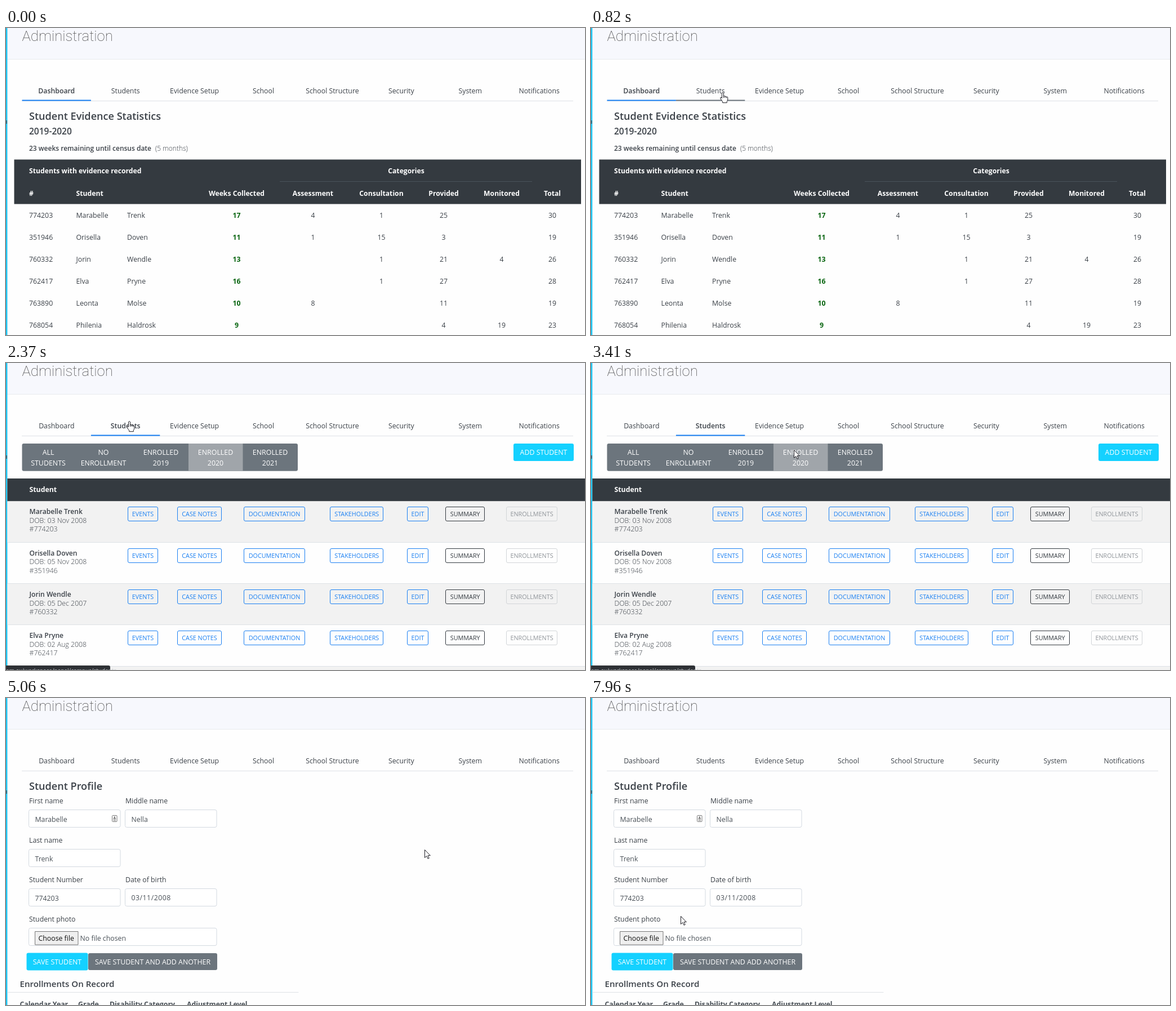
An HTML page with a canvas for the animation above (8 s loop, 1028 px wide and 545 px high).

```html
<!DOCTYPE html>
<html lang="en">
<head>
<meta charset="utf-8">
<title>Administration</title>
<style>
html, body { margin: 0; width: 100%; height: 100%; overflow: hidden; background: #fefefe; }
canvas { display: block; width: 1028px; height: 545px; }
</style>
</head>
<body>
<canvas id="stage" width="1028" height="545"></canvas>
<script>
const ctx = document.getElementById('stage').getContext('2d');
const LOOP = 8000;
const INK = '#3b4148', DARK = '#343a40', LINE = '#dee2e6', BLUE = '#1b80f2',
      CYAN = '#14d1ff', GREY = '#6c757d', BODY = 12.3, CAPS = 12.4, ROW = 39;

const TABS = ['Dashboard', 'Students', 'Evidence Setup', 'School', 'School Structure',
  'Security', 'System', 'Notifications'];

// number, first, last, weeks, assessment, consultation, provided, monitored, total, birth
const PUPILS = [
  ['774203', 'Marabelle', 'Trenk', 17, 4, 1, 25, '', 30, '03 Nov 2008'],
  ['351946', 'Orisella', 'Doven', 11, 1, 15, 3, '', 19, '05 Nov 2008'],
  ['760332', 'Jorin', 'Wendle', 13, '', 1, 21, 4, 26, '05 Dec 2007'],
  ['762417', 'Elva', 'Pryne', 16, '', 1, 27, '', 28, '02 Aug 2008'],
  ['763890', 'Leonta', 'Molse', 10, 8, '', 11, '', 19],
  ['768054', 'Philenia', 'Haldrosk', 9, '', '', 4, 19, 23]
];
const COLUMNS = [['Weeks Collected', 409.5], ['Assessment', 545], ['Consultation', 666.5],
  ['Provided', 777], ['Monitored', 880], ['Total', 970]];
const ACTIONS = [['EVENTS', 216, 54], ['CASE NOTES', 304, 79], ['DOCUMENTATION', 422, 109],
  ['STAKEHOLDERS', 575.5, 94.5], ['EDIT', 712, 38], ['SUMMARY', 780.5, 69.5], ['ENROLLMENTS', 888, 91]];
const FILTERS = [['ALL', 'STUDENTS', 75], ['NO', 'ENROLLMENT', 173], ['ENROLLED', '2019', 275],
  ['ENROLLED', '2020', 372], ['ENROLLED', '2021', 469]];
const FIELDS = [
  ['First name', 'Marabelle', 40.5, 198.5],
  ['Middle name', 'Nella', 211.5, 198.5],
  ['Last name', 'Trenk', 40.5, 268.5],
  ['Student Number', '774203', 40.5, 338.5],
  ['Date of birth', '03/11/2008', 211.5, 338.5]
];

// Pointer keys: time, x, y
const PATH = [
  [0, 535, 560], [270, 525, 550], [440, 391, 345], [560, 322, 232], [760, 245, 128], [1060, 217, 98],
  [1620, 217, 98], [1680, 219, 103], [2960, 219, 103], [3180, 262, 118], [3410, 359, 154],
  [3750, 634, 245], [4000, 738, 273], [4150, 748, 274], [4480, 743, 269], [5620, 743, 269],
  [5800, 690, 277], [6000, 574, 283], [6150, 440, 289], [6410, 220, 244], [6620, 148, 221],
  [6770, 148, 221], [6790, 147, 221], [7370, 147, 221], [7500, 157, 255], [7730, 165, 345],
  [7960, 159, 387], [LOOP, 159, 387]
];

function slope(i, axis) {
  const a = PATH[i - 1], b = PATH[i], c = PATH[i + 1];
  if (!a || !c) return 0;
  const still = (p, q) => p[1] === q[1] && p[2] === q[2];
  return still(a, b) || still(b, c) ? 0 : (c[axis] - a[axis]) / (c[0] - a[0]);
}

function pointerAt(t) {
  let i = 0;
  while (i < PATH.length - 2 && t >= PATH[i + 1][0]) i++;
  const a = PATH[i], b = PATH[i + 1], span = b[0] - a[0], u = Math.max(0, (t - a[0]) / span);
  const at = axis => {
    const d = b[axis] - a[axis], m = slope(i, axis) * span, n = slope(i + 1, axis) * span;
    return a[axis] + u * (m + u * (3 * d - 2 * m - n + u * (m + n - 2 * d)));
  };
  return { x: at(1), y: at(2) };
}

const inside = (p, x, y, w, h) => p.x >= x && p.x < x + w && p.y >= y && p.y < y + h;
const ramp = (t, from, to) => Math.min(1, Math.max(0, (t - from) / (to - from)));

function rect(x, y, w, h, color) {
  ctx.fillStyle = color;
  ctx.fillRect(x, y, w, h);
}

function box(x, y, w, h, r, fill, stroke) {
  ctx.beginPath();
  ctx.roundRect(x, y, w, h, r);
  if (fill) { ctx.fillStyle = fill; ctx.fill(); }
  if (stroke) { ctx.strokeStyle = stroke; ctx.lineWidth = 1; ctx.stroke(); }
}

function text(s, x, y, { size = BODY, weight = 400, color = INK, align = 'left', family = 'Open Sans', gap = 0 } = {}) {
  ctx.font = `${weight} ${size}px "${family}", sans-serif`;
  ctx.letterSpacing = gap + 'px';
  ctx.textAlign = align;
  ctx.fillStyle = color;
  ctx.fillText(s, x, y);
}
const centered = (s, x, y, style) => text(s, x, y, { align: 'center', ...style });

function drawShell(active, hover) {
  rect(0, 0, 1028, 545, '#fefefe');
  rect(0, 0, 1028, 55, '#f7f8fd');
  rect(0, 55, 1028, 1, '#e8eaef');
  rect(0, 0, 2.4, 545, '#1cc5f3');
  rect(0, 164, 2, 6, '#2b6f86');
  text('Administration', 28.5, 22.5, { size: 25.7, weight: 200, family: 'Roboto', color: '#444' });
  rect(28, 129, 979, 1, LINE);
  TABS.forEach((name, i) => {
    const on = i === active;
    centered(name, 89.8 + i * 122.4, 116, { weight: on ? 600 : 400 });
    if (on || i === hover) rect(28.5 + i * 122.4, 127.5, 122.4, 2, on ? BLUE : GREY);
  });
}

function drawDashboard(hoverRow) {
  text('Student Evidence Statistics', 41, 162.5, { size: 18.1, weight: 600 });
  text('2019-2020', 41, 188.5, { size: 15.5, weight: 600 });
  text('23 weeks remaining until census date', 41, 218, { size: 12, weight: 600 });
  text('(5 months)', 265, 218, { size: 12, weight: 300 });
  rect(14.5, 233.5, 1006.5, 79, DARK);
  rect(486, 272, 448, 1, '#4a525a');
  const head = { size: 12.2, weight: 700, color: '#fff' };
  text('Students with evidence recorded', 41, 258, head);
  centered('Categories', 710.5, 258, head);
  text('#', 41, 297.5, head);
  text('Student', 124.5, 297.5, head);
  COLUMNS.forEach(([name, x]) => centered(name, x, 297.5, head));
  PUPILS.forEach((p, i) => {
    const y = 336.7 + i * ROW;
    if (i === hoverRow) rect(15, Math.round(y - 24), 1006, ROW, '#ececec');
    text(p[0], 41, y);
    text(p[1], 124.5, y);
    text(p[2], 215, y);
    COLUMNS.forEach(([, x], c) =>
      centered(p[c + 3], x, y, c ? {} : { weight: 700, color: '#07640f' }));
  });
}

function drawStudents(pointer) {
  box(28.5, 143, 489.5, 48.7, 3, GREY);
  rect(324, 143, 96.5, 48.7, '#a0a5aa');
  FILTERS.forEach(([top, bottom, x]) => {
    centered(top, x, 163, { size: CAPS, color: '#fff' });
    centered(bottom, x, 182, { size: CAPS, color: '#fff' });
  });
  box(901, 143, 107, 31, 3, CYAN);
  centered('ADD STUDENT', 954.5, 163.3, { size: CAPS, color: '#fff' });
  rect(2.4, 205, 1026, 40.5, DARK);
  text('Student', 41.5, 229.3, { weight: 700, color: '#fff' });
  for (let i = 0; i < 5; i++) {
    const y = 245.4 + i * 73.3;
    if (i % 2 === 0) rect(2.4, y, 1026, 73.3, '#f2f2f2');
    if (i) rect(2.4, Math.round(y) - 1, 1026, 1, LINE);
    if (i === 4) break;
    const [id, first, last] = PUPILS[i];
    text(`${first} ${last}`, 41.5, y + 23, { size: 12.1, weight: 600 });
    text('DOB: ' + PUPILS[i][9], 41.5, y + 38.5, { weight: 300 });
    text('#' + id, 41.5, y + 54, { weight: 300 });
    ACTIONS.forEach(([name, x, w], k) => {
      const top = Math.round(y + 10) + .5, color = k < 5 ? BLUE : k === 5 ? DARK : '#8f9499';
      const hot = name === 'EDIT' && inside(pointer, x, top, w, 25);
      box(Math.floor(x) + .5, top, Math.round(w) - 1, 25, 2.5, hot ? '#0d7bfb' : null, k === 6 ? '#d2d5d8' : color);
      centered(name, x + w / 2, y + 27, { size: 10.8, color: hot ? '#fff' : color });
    });
  }
}

function drawProfileIcon(hot) {
  const color = hot ? '#444' : '#777';
  box(188.5, 208.5, 8.5, 11, 1, '#fff', color);
  rect(191.5, 210.5, 2.5, 2.5, color);
  rect(190.5, 213.5, 4.5, 2, color);
  rect(190.5, 217, 4.5, 1, color);
}

function drawProfile(pointer) {
  const soft = '#495057', edge = '#d3d9e0';
  text('Student Profile', 41, 162.5, { size: 18.1, weight: 600 });
  FIELDS.forEach(([label, value, x, y], i) => {
    const date = i === 4;
    text(label, x + .5, y - 11.5);
    box(x, y, 162.5, 31, 3, '#fff', edge);
    text(value, x + 11, y + (date ? 20 : 21), { color: soft, gap: date ? .5 : 0 });
  });
  drawProfileIcon(inside(pointer, 40, 198, 163, 32));
  text('Student photo', 41, 397);
  box(40.5, 408.5, 333.5, 31, 3, '#fff', edge);
  box(51.5, 414.5, 76.5, 23.5, 0, '#efefef', '#777');
  text('Choose file', 57.5, 431, { color: '#111' });
  text('No file chosen', 131.5, 431, { color: soft });
  box(36.5, 452.5, 109, 31, 3, CYAN);
  centered('SAVE STUDENT', 91, 472.7, { size: CAPS, color: '#fff' });
  box(146, 453, 229, 30, 3, GREY);
  centered('SAVE STUDENT AND ADD ANOTHER', 260.5, 472.7, { size: CAPS, color: '#fff' });
  text('Enrollments On Record', 24.5, 512.5, { size: 15.1, weight: 600 });
  rect(2.4, 522, 517, 1, LINE);
  [['Calendar Year', 24.5], ['Grade', 128], ['Disability Category', 184], ['Adjustment Level', 321]]
    .forEach(([name, x]) => text(name, x, 547.8, { weight: 700, color: soft }));
}

function drawStatus(alpha) {
  if (alpha <= 0) return;
  ctx.globalAlpha = alpha;
  box(-4, 537, 189, 20, 3, '#2e3135');
  text('em.ex/workspace/panel/campus/students', 0, 549.5, { size: 10, color: '#c5c8cc' });
  ctx.globalAlpha = 1;
}

const ARROW = new Path2D('M.5 .5V14.5L3.8 11.5L6 16.3L8.2 15.3L6 10.7H10.3Z');
const HAND = new Path2D('M-1.5 1.5Q0-.8 1.5 1.5V7Q3 5.8 4 7.5Q5.6 6.5 6.5 8.3Q8.6 7.5 8.8 9.8V13Q8.5 15 7.3 16.5V18.7H-.3V16.8Q-2.2 14.5-4.2 11Q-4.8 9-3 9L-1.5 10.5Z');
const FINGERS = new Path2D('M1.5 7V10M4 7.5V10M6.5 8.3V10.3');
const BEAM = new Path2D('M-3.5-7H-.8L0-6.3L.8-7H3.5M0-6.3V6.3M-3.5 7H-.8L0 6.3L.8 7H3.5');

function drawPointer(p, kind) {
  ctx.save();
  ctx.translate(Math.round(p.x), Math.round(p.y));
  ctx.lineWidth = 1;
  ctx.lineJoin = 'round';
  ctx.strokeStyle = '#1d1d24';
  ctx.fillStyle = '#fff';
  if (kind === 'beam') {
    ctx.stroke(BEAM);
  } else {
    const shape = kind === 'hand' ? HAND : ARROW;
    ctx.fill(shape);
    ctx.stroke(shape);
    if (kind === 'hand') ctx.stroke(FINGERS);
  }
  ctx.restore();
}

function drawLoader() {
  ctx.setLineDash([2, 2]);
  box(494.5, 210.5, 11, 8, 4, null, '#35503f');
  ctx.setLineDash([]);
}

function render(t) {
  const p = pointerAt(t);
  const page = t < 2130 ? 0 : t < 4890 ? 1 : 2;
  const overTab = inside(p, 151, 94, 122, 35);
  let kind = overTab ? 'hand' : 'arrow';
  drawShell(page < 2 ? page : -1, overTab ? 1 : -1);
  if (page === 0) {
    // The row highlight trails the pointer.
    const trail = pointerAt(t - 60);
    const row = inside(trail, 15, 312, 1006, 233) && t > 270 ? Math.floor((trail.y - 312) / ROW) : -1;
    drawDashboard(row);
    if (inside(p, 15, 312, 1006, 240)) kind = 'hand';
  } else if (page === 1) {
    if (t >= 2270) drawStudents(p);
    if (t >= 4820) drawLoader();
  } else if (t >= 5010) {
    drawProfile(p);
    if (FIELDS.some(([, , x, y]) => inside(p, x, y, 163, 31))) kind = 'beam';
  }
  drawStatus(Math.min(ramp(t, 1200, 1340), 1 - ramp(t, 3700, 3830)));
  if (t >= 270) drawPointer(p, kind);
}

const start = performance.now();
function tick() {
  render((performance.now() - start) % LOOP);
  requestAnimationFrame(tick);
}
tick();
</script>
</body>
</html>
```
